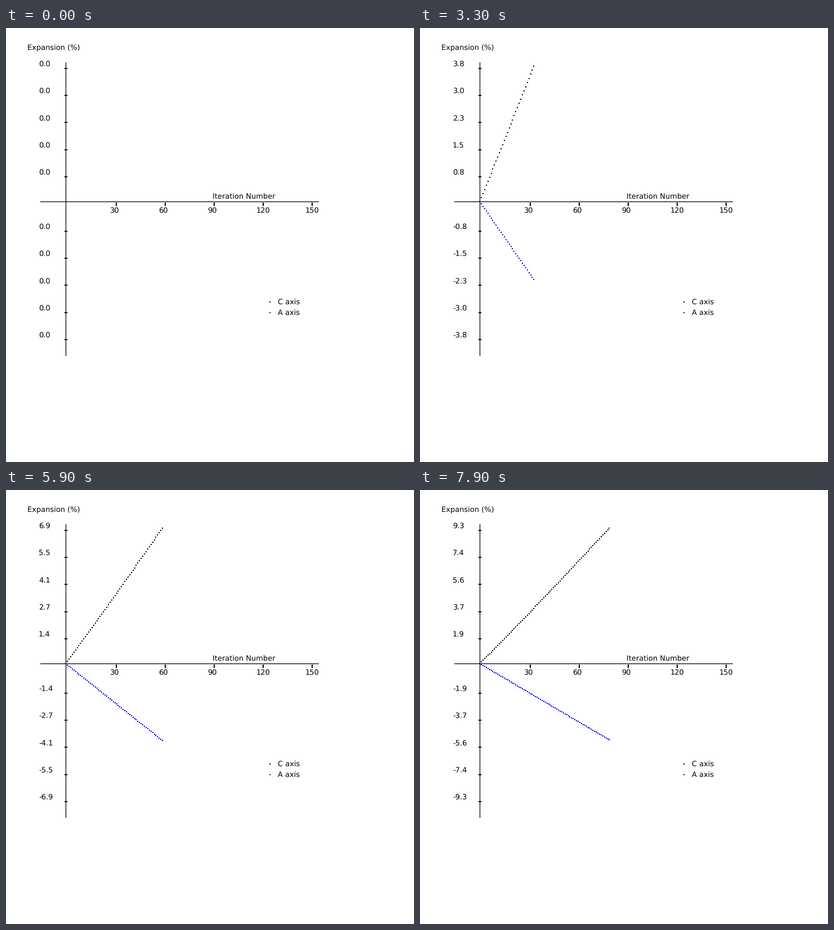
A matplotlib script for the animation above (8000 ms loop, 725 px wide and 773 px high).

```python
import matplotlib.pyplot as plt
import numpy as np
from matplotlib.animation import FuncAnimation
from matplotlib.collections import PolyCollection
from matplotlib.patches import Rectangle

W, H, DPI = 725, 773, 64
FRAMES, INTERVAL = 80, 100
PITCH = 145 / 3          # distance between vertical ticks
ZERO_Y = 309.25          # height of the zero line
BLACK, BLUE = "black", "blue"

plt.rcParams.update({
    "font.family": "DejaVu Sans",
    "font.size": 13 * 72 / DPI,
    "text.hinting": "no_hinting",
    "toolbar": "None",
})

fig = plt.figure(figsize=(W / DPI, H / DPI), dpi=DPI, facecolor="white")
ax = fig.add_axes([0, 0, 1, 1])
ax.set_xlim(0, W)
ax.set_ylim(H, 0)
ax.axis("off")


def box(x, y, w, h, color=BLACK):
    ax.add_patch(Rectangle((x, y), w, h, facecolor=color, linewidth=0))


def axis_line(xs, ys):
    ax.plot(xs, ys, color=BLACK, linewidth=1.25 * 72 / DPI,
            solid_capstyle="butt", snap=False)


def label(x, y, text):
    return ax.text(x, y, text, ha="left", va="baseline", color=BLACK)


def c_axis(i):
    return i * (0.113 + 5.6e-5 * i)


def a_axis(i):
    return -0.066 * i


def dots(x, y):
    """Two-pixel squares, given right edges and vertical centres."""
    left, top = x - 2, y - 1
    return np.stack([
        np.column_stack([left, top]),
        np.column_stack([left + 2, top]),
        np.column_stack([left + 2, top + 2]),
        np.column_stack([left, top + 2]),
    ], axis=1)


# Axes
axis_line([61, 556], [309.5, 309.5])
axis_line([106.5, 106.5], [61, 584])
label(38, 39, "Expansion (%)")
label(367, 305, "Iteration Number")

for k in range(1, 6):
    box(108 + 87 * k, 311, 2, 6)
    label(97 + 87 * k, 329, str(30 * k))

scale_labels = []
for step in (5, 4, 3, 2, 1, -1, -2, -3, -4, -5):
    offset = (5 - step) * PITCH
    box(104, round(70.6 + offset), 5, 2)
    scale_labels.append((step / 5, label(58, round(68 + offset), "0.0")))

# Legend
box(468, 487, 2, 2)
box(468, 506, 2, 2, BLUE)
label(483, 493, "C axis")
label(483, 512, "A axis")

series = []
for func, color in ((c_axis, BLACK), (a_axis, BLUE)):
    points = PolyCollection([], facecolors=color, edgecolors="none",
                            linewidths=0, zorder=3)
    ax.add_collection(points, autolim=False)
    series.append((func, points))


def update(n):
    peak = c_axis(n)
    for share, text in scale_labels:
        text.set_text(f"{share * peak:.1f}" if n else "0.0")

    i = np.arange(n + 1)
    x = np.floor(107.65 + 2.915 * i)
    for func, points in series:
        if n:
            y = np.round(ZERO_Y - 5 * PITCH * func(i) / peak)
            points.set_verts(dots(x, y))
        else:
            points.set_verts([])
    return [text for _, text in scale_labels] + [p for _, p in series]


anim = FuncAnimation(fig, update, frames=FRAMES, init_func=lambda: update(0),
                     interval=INTERVAL, repeat=True, repeat_delay=0)
plt.show()
```
